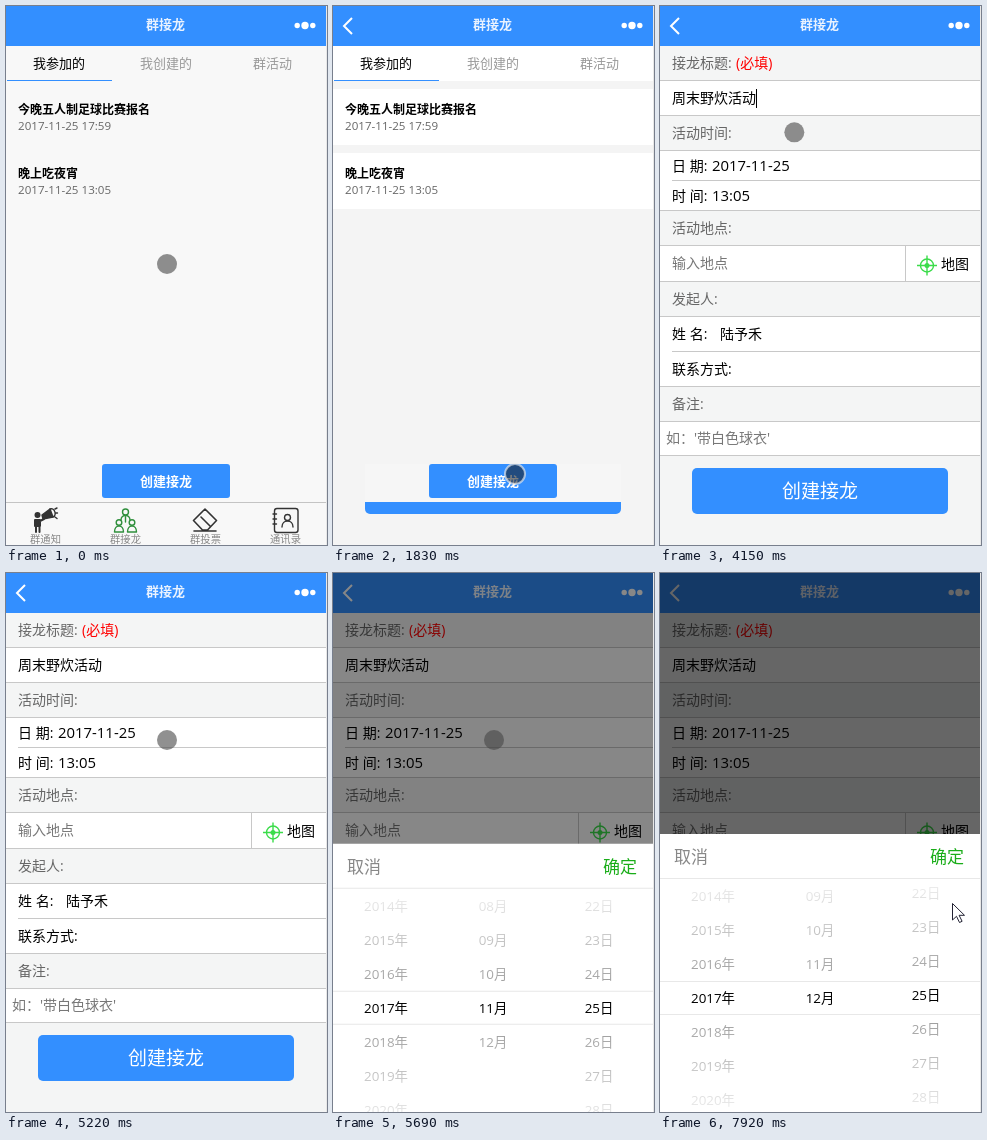
Animation, 321 px wide and 539 px high, one loop 8 s. Source, as an HTML page:

```html
<!DOCTYPE html>
<html lang="zh-CN">
<head>
<meta charset="utf-8">
<title>群接龙</title>
<style>
  html, body { margin: 0; width: 100%; height: 100%; overflow: hidden; background: #f8f8f8; }
  svg { display: block; width: 100%; height: 100%; }
  text { font: 14px "Open Sans", "Noto Sans CJK SC", "Noto Sans CJK", sans-serif; fill: #000; white-space: pre; }
  .mid { text-anchor: middle; }
  .bold { font-weight: bold; }
  .s10 { font-size: 10.3px; fill: #888; }
  .s12 { font-size: 12px; }
  .s13 { font-size: 13px; }
  .s17 { font-size: 17px; }
  .s19 { font-size: 19px; }
  .stamp { font-size: 11.6px; fill: #666; }
  .num { font-size: 14.9px; }
  .label { fill: #666; }
  .hint { fill: #777; }
  .dim { fill: #999; }
  .white { fill: #fff; }
  .blue { fill: #338fff; }
  .pick text { font-size: 13.4px; text-anchor: middle; }
  .icon { fill: none; stroke: #333; stroke-width: 1.4; stroke-linecap: round; stroke-linejoin: round; }
</style>
</head>
<body>
<svg viewBox="0 0 321 539" preserveAspectRatio="none">
  <defs>
    <linearGradient id="fadeTop" x2="0" y2="1">
      <stop stop-color="#fff" stop-opacity=".95"/><stop offset="1" stop-color="#fff" stop-opacity=".6"/>
    </linearGradient>
    <linearGradient id="fadeEnd" x2="0" y2="1">
      <stop stop-color="#fff" stop-opacity=".6"/><stop offset="1" stop-color="#fff" stop-opacity=".95"/>
    </linearGradient>
    <clipPath id="wheel"><path d="M0 45h320v238H0z"/></clipPath>
  </defs>

  <g id="list">
    <rect id="listBg" width="321" height="539" fill="#f8f8f8"/>
    <g id="cards">
      <path class="white" d="M0 40h320v35H0zM0 83h320v56H0zM0 147h320v56H0z"/>
      <path class="blue" d="M32 496h256v7a5 5 0 0 1-5 5H37a5 5 0 0 1-5-5z"/>
      <path fill="#f6f6f6" d="M32 458h256v38H32z"/>
    </g>
    <text class="s13 mid" x="53" y="62" fill="#333">我参加的</text>
    <text class="s13 mid dim" x="160" y="62">我创建的</text>
    <text class="s13 mid dim" x="266.5" y="62">群活动</text>
    <path class="blue" d="M1 74h105v1H1z"/>
    <text class="s12 bold" x="12" y="108">今晚五人制足球比赛报名</text>
    <text class="stamp" x="12" y="124">2017-11-25 17:59</text>
    <text class="s12 bold" x="12" y="172">晚上吃夜宵</text>
    <text class="stamp" x="12" y="188">2017-11-25 13:05</text>
    <rect class="blue" x="96" y="458" width="128" height="34" rx="3"/>
    <text class="s13 mid bold white" x="160" y="480">创建接龙</text>
    <g id="tabs">
      <path fill="#c4c4c4" d="M0 496h320v1H0z"/>
      <g class="icon">
        <circle cx="31.5" cy="509" r="2.3" fill="#333"/>
        <path d="M29 514h5v6h-5zM30 520v6M33.500 520v6M34 515l4-2" fill="#333" stroke-width="2"/>
        <path d="M36 509l8-6 3 8-10 2z" fill="#333"/>
        <path d="M44 503c5-2 7 7 3 8M49 503l2-1M50 507h1.500M49 511l2 1.500"/>
      </g>
      <g class="icon" style="stroke:#2f8f3c">
        <circle cx="119.500" cy="506" r="3"/><path d="M115 514c0-6 9-6 9 0M119.500 511v5"/>
        <circle cx="113" cy="516.500" r="2.800"/><path d="M108.500 526c0-8 9-8 9 0z"/>
        <circle cx="126" cy="516.500" r="2.800"/><path d="M121.500 526c0-8 9-8 9 0z"/>
      </g>
      <g class="icon">
        <path d="M199 503l11.500 11.500-9 9.500h-5l-9-9.500zM195 511l9 9M188 525h22" stroke-width="1.600"/>
      </g>
      <g class="icon" stroke-width="1.200">
        <rect x="268.500" y="502.500" width="23.500" height="24" rx="2.500"/>
        <circle cx="281.500" cy="511.500" r="3"/><path d="M276 521c0-8 11-8 11 0M267 508h3.500M267 513h3.500M267 518h3.500"/>
      </g>
      <text class="s10 mid" x="39.500" y="537">群通知</text>
      <text class="s10 mid" x="119.500" y="537">群接龙</text>
      <text class="s10 mid" x="199.500" y="537">群投票</text>
      <text class="s10 mid" x="279.500" y="537">通讯录</text>
    </g>
  </g>

  <g id="form">
    <path fill="#f4f5f5" d="M0 40h321v499H0z"/>
    <path class="white" d="M0 75h320v34H0zM0 145h320v59H0zM0 240h320v35H0zM0 311h320v69H0zM0 416h320v33H0z"/>
    <path fill="none" stroke="#c8c8c8" d="M0 74.500h320M0 109.500h320M0 144.500h320M12 174.500h308M0 204.500h320M0 239.500h320M0 275.500h320M0 310.500h320M12 345.500h308M0 380.500h320M0 415.500h320M0 449.500h320M245.500 240v35"/>
    <text class="label" x="12" y="62">接龙标题: <tspan x="76" fill="#f00">(必填)</tspan></text>
    <text class="hint" id="hint" x="12" y="97">如："五人制足球赛"</text>
    <text id="typed" x="12" y="97">周末野炊活动</text>
    <rect id="caret" y="83" width="1" height="19"/>
    <text class="label" x="12" y="132">活动时间:</text>
    <text x="12" y="165">日 期:</text><text class="num" x="52" y="165">2017-11-25</text>
    <text x="12" y="195">时 间:</text><text class="num" x="52" y="195">13:05</text>
    <text class="label" x="12" y="227">活动地点:</text>
    <text class="hint" x="12" y="262">输入地点</text>
    <g fill="none" stroke="#3bdc4a" stroke-width="1.400">
      <circle cx="267" cy="259.500" r="6.500"/>
      <path d="M257 259.500h20M267 249.500v20"/>
      <circle cx="267" cy="259.500" r="2.500" fill="#3bdc4a" stroke="none"/>
    </g>
    <text x="281" y="263">地图</text>
    <text class="label" x="12" y="298">发起人:</text>
    <text x="12" y="333">姓 名:</text><text x="60" y="333">陆予禾</text>
    <text x="12" y="368">联系方式:</text>
    <text class="label" x="12" y="403">备注:</text>
    <text class="hint" x="6" y="437">如：'带白色球衣'</text>
    <rect class="blue" x="32" y="462" width="256" height="46" rx="5"/>
    <text class="s19 mid white" x="160" y="492">创建接龙</text>
  </g>

  <path class="blue" d="M0 0h320v40H0z"/>
  <text class="s13 mid bold" x="159.500" y="23" style="fill:#e9f2ff">群接龙</text>
  <path id="back" d="M19 12l-8 8 8 8" fill="none" stroke="#fff" stroke-width="2"/>
  <g class="white">
    <circle cx="291.200" cy="19.500" r="2.700"/><circle cx="299" cy="19.500" r="3.700"/><circle cx="306.800" cy="19.500" r="2.700"/>
  </g>
  <path fill="#e8e8e8" d="M320 0h1v539h-1z"/>

  <rect id="shade" width="320" height="539"/>
  <g id="sheet">
    <path class="white" d="M0 0h320v278H0z"/>
    <text class="s17" x="14" y="29" style="fill:#888">取消</text>
    <text class="s17" x="270" y="29" style="fill:#1aad19">确定</text>
    <g class="pick" clip-path="url(#wheel)">
      <g id="years"></g><g id="months"></g><g id="days"></g>
    </g>
    <path fill="url(#fadeTop)" d="M0 45h320v102H0z"/>
    <path fill="url(#fadeEnd)" d="M0 181h320v102H0z"/>
    <path fill="#e8e8e8" d="M0 44h320v1H0zM0 147h320v1H0zM0 180h320v1H0z"/>
  </g>

  <circle id="touch" r="10"/>
  <path id="arrow" d="M0 0v16.500l4-3.700 3 6.200 2.600-1.200-3-6H12z" fill="#fff" stroke="#223" stroke-linejoin="round"/>
</svg>
<script>
const $ = id => document.getElementById(id);
const LOOP = 8000, ROW = 34;

// Screen updates come in bursts: [first, last, count]
const bursts = [[130, 850, 7], [970, 1210, 3], [1590, 2310, 7], [2430, 2670, 3], [3290, 3290, 1],
  [3910, 4610, 7], [4740, 5220, 5], [5560, 6260, 7], [6380, 6630, 3], [6880, 7670, 8], [7800, 7920, 2]];
const ticks = [0, ...bursts.flatMap(([a, b, n]) =>
  Array.from({ length: n }, (_, i) => a + (n > 1 ? (b - a) * i / (n - 1) : 0)))];

// Keys: [time, value, value...]
const pointer = [[0, 161, 258], [130, 150, 243], [250, 122, 242], [370, 88, 270], [490, 70, 326],
  [610, 82, 386], [730, 120, 426], [850, 154, 445], [970, 154, 448], [1210, 157, 468],
  [1590, 172, 468], [1710, 182, 468], [1830, 182, 468], [1950, 180, 420], [2310, 147, 144],
  [2670, 117, 99], [3910, 117, 99], [4610, 169, 181], [4740, 168, 187], [5220, 161, 167],
  [5680, 161, 167], [6260, 199, 333], [6380, 198.5, 324.5], [6630, 201.5, 316.5],
  [6880, 215, 338], [7220, 265, 402], [7440, 305, 380], [7670, 293, 336],
  [7800, 292.5, 332.5], [7920, 292.5, 330.5]];
const sheetTop = [[5440, 539], [5560, 406], [5680, 267], [5790, 261]];
const shadeAlpha = [[5440, 0], [5560, .2], [5680, .48], [5790, .6]];
const monthShift = [[6260, 0], [6380, -8], [6630, -ROW]];
const dayShift = [[7670, 0], [7920, -3]];

function sample(keys, t) {
  const i = keys.findIndex(k => k[0] > t);
  if (i < 0) return keys[keys.length - 1].slice(1);
  if (!i) return keys[0].slice(1);
  const [a, b] = [keys[i - 1], keys[i]];
  const p = (t - a[0]) / (b[0] - a[0]);
  return a.slice(1).map((v, j) => v + (b[j + 1] - v) * p);
}

function fillWheel(id, x, first, last, chosen, unit) {
  for (let n = first; n <= last; n++) {
    const label = document.createElementNS("http://www.w3.org/2000/svg", "text");
    label.setAttribute("x", x);
    label.setAttribute("y", 169 + (n - chosen) * ROW);
    label.textContent = String(n).padStart(2, "0") + unit;
    $(id).append(label);
  }
}
fillWheel("years", 53, 2013, 2021, 2017, "年");
fillWheel("months", 160, 7, 12, 11, "月");
fillWheel("days", 266, 21, 29, 25, "日");

const show = (id, on) => $(id).style.display = on ? "" : "none";
const move = (id, x, y) => $(id).setAttribute("transform", `translate(${x} ${y})`);
const within = (t, a, b) => t >= a && t < b;

function draw(now) {
  const time = now % LOOP;
  const t = ticks.findLast(v => v <= time);

  const leaving = t >= 1820, inForm = t >= 1940, filled = t >= 4020;
  show("list", !inForm);
  show("form", inForm);
  show("back", leaving);
  show("cards", leaving);
  show("tabs", !leaving);
  $("listBg").setAttribute("fill", leaving ? "#f4f4f4" : "#f8f8f8");

  show("hint", !filled);
  show("typed", filled);
  show("caret", within(t, 2670, 3290) || within(t, 3910, 4740));
  $("caret").setAttribute("x", filled ? 96 : 12);

  $("shade").setAttribute("opacity", sample(shadeAlpha, t)[0]);
  move("sheet", 0, sample(sheetTop, t)[0]);
  move("months", 0, sample(monthShift, t)[0]);
  move("days", 0, sample(dayShift, t)[0]);

  const [x, y] = sample(pointer, t);
  const dragging = within(t, 6380, 6880) || t >= 7800;
  const pressed = within(t, 1700, 1940) || within(t, 5560, 5670);
  show("touch", !dragging);
  show("arrow", dragging);
  move(dragging ? "arrow" : "touch", x, y);
  $("touch").setAttribute("fill", pressed ? "rgba(20,20,20,.55)" : "rgba(70,70,70,.6)");
  $("touch").setAttribute("stroke", pressed ? "rgba(235,235,235,.65)" : "none");
  $("touch").setAttribute("stroke-width", 2);
  requestAnimationFrame(() => draw(performance.now()));
}
draw(performance.now());
</script>
</body>
</html>
```
